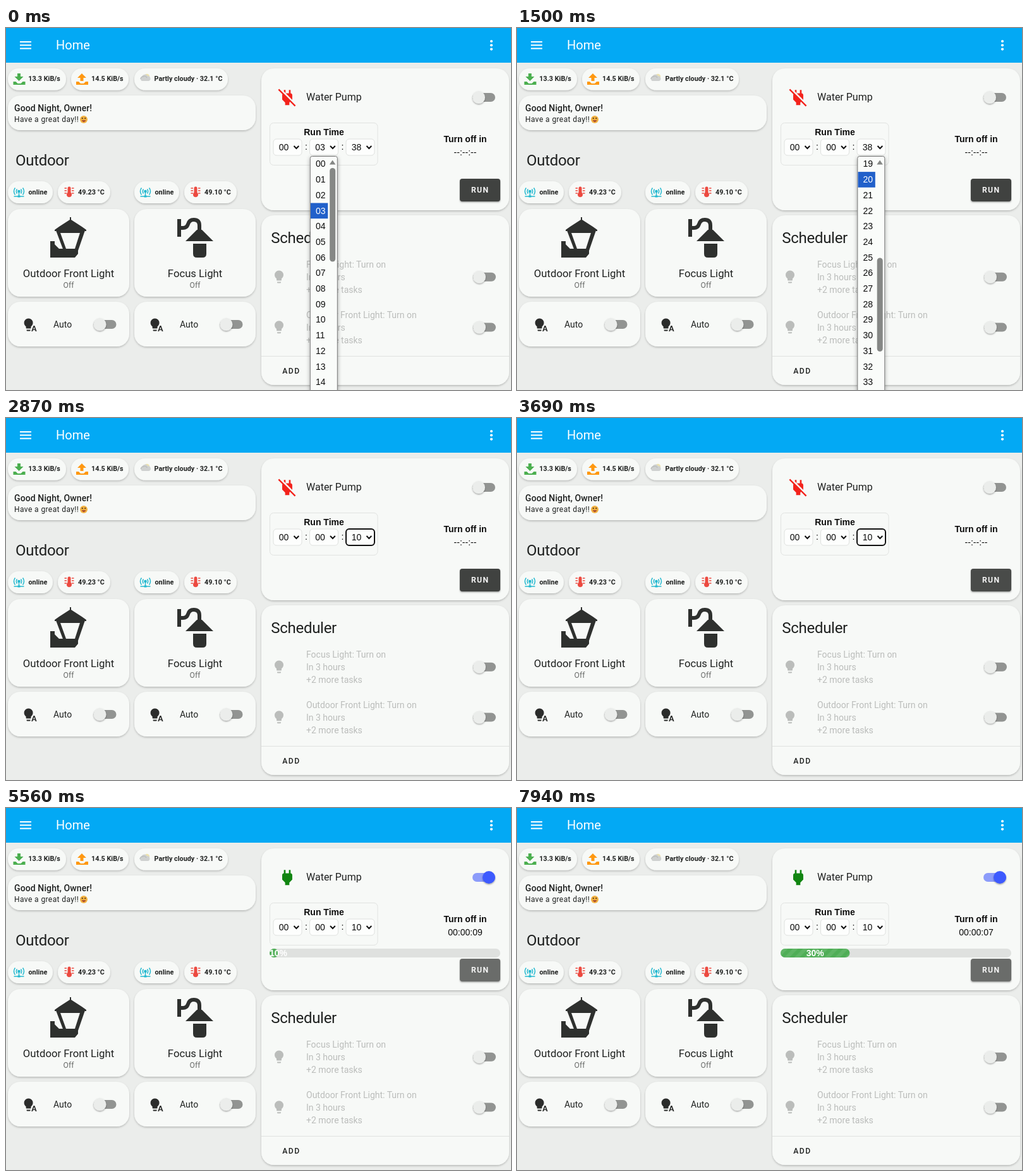
Write an HTML page that moves like this. It is 799 px wide and 574 px high and loops after 8 s.

```html
<!DOCTYPE html>
<html lang="en">
<head>
<meta charset="utf-8">
<title>Home</title>
<style>
html, body { margin: 0; width: 799px; height: 574px; overflow: hidden; background: #ebedeb; }
svg { display: block; }
text { font-family: Roboto, sans-serif; fill: #1f2120; white-space: pre; }
.ar { font-family: "Liberation Sans", Arial, sans-serif; font-size: 14px; fill: #0c0c0c; }
.b { font-weight: 700; }
.m { text-anchor: middle; }
.card { fill: #f7f9f7; filter: url(#cardShadow); }
.chip { font-size: 10.8px; font-weight: 700; }
.task { font-size: 14px; fill: #bbbdbb; }
.h { font-size: 24px; letter-spacing: -.29px; }
</style>
</head>
<body>
<svg id="stage" width="799" height="574" viewBox="0 0 799 574" xmlns="http://www.w3.org/2000/svg"></svg>
<script>
const LOOP = 8000;
const ROW = 24.7;        // height of a list row
const LIST_TOP = 203.4;
const COL = 57.5;        // distance between the three selects
const START = 4480;      // pump switches on
const svg = document.getElementById('stage');

const box = (x, y, w, h, r, extra = '') =>
  `<rect x="${x}" y="${y}" width="${w}" height="${h}" rx="${r}" ${extra}/>`;
const card = (x, y, w, h, r = 20) => box(x, y, w, h, r, 'class="card"');
const text = (x, y, s, cls = '', extra = '') =>
  `<text x="${x}" y="${y}" class="${cls}" ${extra}>${s}</text>`;
const icon = (x, y, d, fill, scale = 1) =>
  `<path transform="translate(${x} ${y}) scale(${scale})" d="${d}" fill="${fill}"/>`;
const group = (id, body, extra = '') => `<g id="${id}" ${extra}>${body}</g>`;

const PLUG = 'M16 7V3H14V7H10V3H8V7C7 7 6 8 6 9V14.5L9.5 18V21H14.5V18L18 14.5V9C18 8 17 7 16 7Z';
const PLUG_OFF = 'M20.84 22.73L15.31 17.2L14.5 18V21H9.5V18L6 14.5V9C6 8.7 6.1 8.41 6.25 8.14L1.11 3L2.39 1.73L22.11 21.46ZM18 14.5V9C18 8 17 7 16 7V3H14V7H10.2L17.85 14.65ZM10 3H8V4.8L10 6.8Z';
const BULB = 'M12 2A7 7 0 0 0 5 9C5 11.4 6.2 13.5 8 14.7V17A1 1 0 0 0 9 18H15A1 1 0 0 0 16 17V14.7C17.8 13.5 19 11.4 19 9A7 7 0 0 0 12 2M9 21A1 1 0 0 0 10 22H14A1 1 0 0 0 15 21V20H9Z';
const LETTER_A = 'M19 13H17L13.8 22H15.7L16.4 20H19.6L20.3 22H22.2ZM16.85 18.65L18 15L19.15 18.65Z';

function toggle(x, y, id = '') {
  return box(x - 10, y - 7, 36, 14, 7, `fill="#929492" id="${id}Track"`) +
    `<circle id="${id}Knob" cx="${x}" cy="${y}" r="10" fill="#ebedeb" filter="url(#knobShadow)"/>`;
}

function transfer(x, color, arrow) {
  return `<g fill="${color}"><path d="${arrow}" transform="translate(${x} 0)"/>
    <path transform="translate(${x} 0)" d="M-9 85H-5L-2 88H3L6 85H10V90H-9Z"/></g>`;
}

function network(x) {
  return `<g transform="translate(${x} 260)" fill="none" stroke="#25b9d0" stroke-width="1.5">
    <circle cy="-1" r="1.6" fill="#25b9d0"/><path d="M0 0V6M-8 7H8"/>
    <path d="M-3 -4.5Q-5.4 -1 -3 2.5M3 -4.5Q5.4 -1 3 2.5M-6 -6.5Q-10 -1 -6 4.5M6 -6.5Q10 -1 6 4.5"/>
    <path d="M-2 7H2" stroke-width="3"/></g>`;
}

function thermo(x) {
  return `<g transform="translate(${x} 260)" stroke="#ec4a40" fill="#ec4a40">
    <path d="M0 -6V3" stroke-width="5" stroke-linecap="round"/><circle cy="4.2" r="3.6"/>
    <path d="M-7.5 -6H-4M-7.5 -2H-4M-7.5 2H-4M4 -6H7.5M4 -2H7.5M4 2H7.5" stroke-width="1.6"/></g>`;
}

function column(x, name, lamp) {
  return card(x, 243, 71, 35, 17.5) + network(x + 17.5) + text(x + 32.5, 263.6, 'online', 'chip') +
    card(x + 79, 243, 83, 35, 17.5) + thermo(x + 97) +
    text(x + 111, 263.6, x < 100 ? '49.23 °C' : '49.10 °C', 'chip') +
    card(x, 287, 192, 139) + lamp +
    text(x + 96, 394.5, name, 'm', 'font-size="16.7"') +
    text(x + 96, 412.4, 'Off', 'm', 'font-size="12.2" style="fill:#6b6d6b"') +
    card(x, 434, 192, 71) + icon(x + 20.6, 458.5, BULB, '#2b2c2b') + icon(x + 23.4, 459, LETTER_A, '#2b2c2b') +
    text(x + 72, 474.8, 'Auto', '', 'font-size="14"') + toggle(x + 145.5, 470);
}

function task(y, name) {
  return icon(420, y + 7.5, BULB, '#bbbdbb') + text(475, y + 5, name, 'task') +
    text(475, y + 25, 'In 3 hours', 'task') + text(475, y + 45, '+2 more tasks', 'task') +
    toggle(749, y + 19.8);
}

function select(i) {
  const x = 423 + i * COL;
  return box(x, 176, 45, 26, 5, `id="sel${i}" fill="#fdfefd" stroke="#dfe1df"`) +
    text(x + 8.8, 194, '00', 'ar', `id="val${i}"`) +
    `<path d="M${x + 32.5} 187l3.9 4 3.9-4" fill="none" stroke="#111" stroke-width="2"/>` +
    (i < 2 ? text(x + 52, 193, ':', 'ar m') : '');
}

const lampA = `<g fill="#2e302e"><path d="M101 300H103V304L120 315 127 320V322H77V320L84 315 101 304Z"/>
  <path fill-rule="evenodd" d="M79 321H125L114 353V358L109 364H96L91 358V353ZM86 325H117L109 350H95Z"/>
  <path d="M70 338H77V343L84 350H91V356L98 364H70Z"/></g>`;
const lampB = `<g fill="#2e302e"><path d="M271 303H277V331H271Z"/>
  <path d="M275 317H280Q286 317 288 311Q290 304 297 304Q306 304 306 313V323" fill="none" stroke="#2e302e" stroke-width="6"/>
  <path d="M302 320H310L328 338H284ZM296 342H317V358Q317 364 311 364H302Q296 364 296 358Z"/></g>`;

const rows = [...Array(60).keys()].map(i =>
  text(8.2, 17.1 + i * ROW, String(i).padStart(2, '0'), 'ar', `id="row${i}"`)).join('');

svg.innerHTML = `<defs>
  <filter id="cardShadow" x="-10%" y="-20%" width="120%" height="150%">
    <feDropShadow dx="0" dy="1.6" stdDeviation="1.5" flood-color="#000" flood-opacity=".22"/></filter>
  <filter id="knobShadow" x="-40%" y="-40%" width="180%" height="190%">
    <feDropShadow dx="0" dy="1.3" stdDeviation="1.2" flood-color="#000" flood-opacity=".38"/></filter>
  <filter id="listShadow" x="-40%" y="-5%" width="180%" height="110%">
    <feDropShadow dx="0" dy="2" stdDeviation="3" flood-color="#000" flood-opacity=".35"/></filter>
  <clipPath id="listClip"><rect y="204" width="42" height="370"/></clipPath>
  <clipPath id="runClip"><rect x="718" y="239" width="64" height="36" rx="4"/></clipPath>
  <pattern id="stripes" width="16" height="16" patternUnits="userSpaceOnUse">
    <path d="M0 16L16 0H8L0 8ZM16 16V8L8 16Z" fill="#fff" opacity=".09"/></pattern>
  </defs>` +
  '<rect width="799" height="574" fill="#ebedeb"/><rect width="799" height="55" fill="#03a9f4"/>' +
  '<path d="M22 22H40M22 27.3H40M22 32.6H40" stroke="#fff" stroke-width="2"/>' +
  [21, 27.3, 33.6].map(y => `<circle cx="768" cy="${y}" r="2.1" fill="#fff"/>`).join('') +
  text(79, 34.3, 'Home', '', 'font-size="20" style="fill:#fff"') +

  card(3, 64, 92, 34.5, 17) + transfer(20.5, '#4caf50', 'M-2.5 72H2.5V77H7L0 84L-7 77H-2.5Z') +
  text(35.3, 84.4, '13.3 KiB/s', 'chip') +
  card(103, 64, 91, 34.5, 17) + transfer(120, '#ff9810', 'M-2.5 84H2.5V79H7L0 72L-7 79H-2.5Z') +
  text(135, 84.4, '14.5 KiB/s', 'chip') +
  card(203, 64, 148, 34.5, 17) +
  '<circle cx="223" cy="77" r="4.2" fill="#eee3ae"/>' +
  group('cloud', '<path d="M215 84a4 4 0 0 1 0-7a5 5 0 0 1 9-1a4.2 4.2 0 0 1 2 8z" fill="#cfd1d0"/><path d="M213 81a4 4 0 0 1 4-4a4.5 4.5 0 0 1 6 2" stroke="#b9bcbb" stroke-width="1.4" fill="none"/>') +
  text(234.5, 84.4, 'Partly cloudy · 32.1 °C', 'chip') +

  card(3, 107, 392, 55) +
  text(13, 132.3, 'Good Night, Owner!', '', 'font-size="14" font-weight="500" letter-spacing=".1"') +
  text(13, 149.2, 'Have a great day!!', '', 'font-size="12" letter-spacing=".4"') +
  '<circle cx="123" cy="145" r="6" fill="#f3b342"/><path d="M119.6 146.3Q123 152 126.6 146.3Z" fill="#a4432c"/><circle cx="120.8" cy="143.2" r="1.1" fill="#59391d"/><circle cx="125.3" cy="143.2" r="1.1" fill="#59391d"/>' +
  text(15, 218.4, 'Outdoor', 'h') +
  column(3, 'Outdoor Front Light', lampA) + column(203, 'Focus Light', lampB) +

  card(404, 64, 392, 225) +
  group('plugOff', icon(429, 94.2, PLUG_OFF, '#f3231c', 1.33)) +
  group('plugOn', icon(429, 94.2, PLUG, '#118511', 1.33)) +
  text(475, 115, 'Water Pump', '', 'font-size="16"') + toggle(748, 110, 'pump') +
  box(417.5, 150.5, 170.5, 67, 6, 'fill="none" stroke="#e1e3e1"') +
  text(503, 169.8, 'Run Time', 'ar b m') + [0, 1, 2].map(select).join('') +
  text(726.5, 181, 'Turn off in', 'ar b m') + text(726.5, 201.6, '', 'ar m', 'id="left"') +
  group('meter', box(417, 223, 365, 14, 7, 'fill="#dfe1df"') +
    box(417, 223, 0, 14, 7, 'fill="#4fae56" id="fill"') + box(417, 223, 0, 14, 7, 'fill="url(#stripes)" id="sheen"') +
    text(417, 235, '', 'ar b m', 'id="pct" style="fill:#fff"')) +
  box(718, 239, 64, 36, 4, 'id="run" filter="url(#knobShadow)"') +
  '<circle id="ripple" cx="750" cy="257" r="0" fill="#fff" clip-path="url(#runClip)"/>' +
  text(736, 261.3, 'RUN', '', 'font-size="12.2" font-weight="700" letter-spacing="1.3" style="fill:#f4f4f4"') +

  card(404, 297, 392, 269) + text(419.3, 341, 'Scheduler', 'h') +
  task(375, 'Focus Light: Turn on') + task(454.8, 'Outdoor Front Light: Turn on') +
  '<path d="M404 520.5H796" stroke="#e0e2e0"/>' +
  text(437.3, 548, 'ADD', '', 'font-size="12.2" font-weight="500" letter-spacing="1.4"') +

  group('list', box(-.5, 203.5, 43, 480, 3, 'fill="#fafcfa" stroke="#777" filter="url(#listShadow)"') +
    '<g clip-path="url(#listClip)">' + group('rows',
      box(0, 0, 27.5, ROW, 0, 'id="mark" fill="#2160ca"') + rows) +
    '<path d="M30 216.5L34.8 209.5L39.6 216.5Z" fill="#858785"/>' +
    box(30.4, 222, 9, 148.5, 4.5, 'id="thumb" fill="#858785"') + '</g>');

const el = {};
svg.querySelectorAll('[id]').forEach(n => el[n.id] = n);
const set = (id, attrs) => { for (const k in attrs) el[id].setAttribute(k, attrs[k]); };
const show = (id, on) => set(id, { display: on ? 'inline' : 'none' });
const clamp = v => Math.max(0, Math.min(1, v));
const easeOut = (p, n) => 1 - Math.pow(1 - clamp(p), n);

// which list is open, its scroll in px and the highlighted row
function listState(t) {
  if (t < 560) return { col: 1, scroll: 0, hot: t < 250 ? 3 : Math.max(0, 2 - Math.floor((t - 250) / 80)) };
  if (t < 1120 || t >= 2750) return null;
  const hot = t < 1300 ? 38 : t < 2200 ? 20 : Math.min(10, 4 + Math.floor((t - 2200) / 60));
  return { col: 2, scroll: 19 * ROW - 400 * easeOut((t - 1810) / 290, 1.6), hot };
}

function drawList(t) {
  const s = listState(t);
  show('list', s);
  if (!s) return;
  set('list', { transform: `translate(${424.3 + s.col * COL} 0)` });
  set('rows', { transform: `translate(0 ${LIST_TOP - s.scroll})` });
  set('mark', { y: s.hot * ROW });
  set('thumb', { y: 222 + s.scroll / ROW * 7.5 });
  for (let i = 0; i < 60; i++) el['row' + i].style.fill = i === s.hot ? '#fff' : '#0c0c0c';
}

function drawPump(t) {
  const on = t >= START;
  const k = easeOut((t - START) / 120, 2);
  show('plugOn', on);
  show('plugOff', !on);
  show('meter', on);
  set('pumpKnob', { cx: 748 + 16 * k, fill: on ? '#3d5afe' : '#ebedeb' });
  set('pumpTrack', { fill: on ? '#8c9cfa' : '#929492' });
  const n = Math.max(0, Math.floor((t - START) / 1000));
  el.left.textContent = on ? '00:00:' + String(10 - n).padStart(2, '0') : '--:--:--';
  const w = n ? 36.5 * (n - 1 + easeOut((t - START - n * 1000) / 400, 2.2)) : 0;
  set('fill', { width: w });
  set('sheen', { width: w });
  set('stripes', { patternTransform: `translate(${-t / 60 % 16} 0)` });
  el.pct.textContent = n * 10 + '%';
  set('pct', { x: 417 + Math.max(w, n ? 28 : 20) / 2 });
}

function draw(t) {
  el.val1.textContent = t < 560 ? '03' : '00';
  el.val2.textContent = t < 2750 ? '38' : '10';
  const ring = [false, t >= 560 && t < 1120, t >= 2750 && t < 4250];
  ring.forEach((on, i) => set('sel' + i, { stroke: on ? '#111' : '#dfe1df', 'stroke-width': on ? 2 : 1 }));
  drawList(t);
  drawPump(t);
  set('run', { fill: t < 3450 ? '#414241' : t < 4250 ? '#4a4b4a' : '#6b6c6a' });
  const r = (t - 4250) / 400;
  set('ripple', { r: r > 0 && r < 1 ? 40 * easeOut(r, 2) : 0, opacity: .2 * (1 - clamp(r)) });
  set('cloud', { transform: `translate(${Math.sin(t / LOOP * Math.PI * 8).toFixed(2)} 0)` });
}

const begin = performance.now();
function tick() {
  draw((performance.now() - begin) % LOOP);
  requestAnimationFrame(tick);
}
tick();
</script>
</body>
</html>
```
